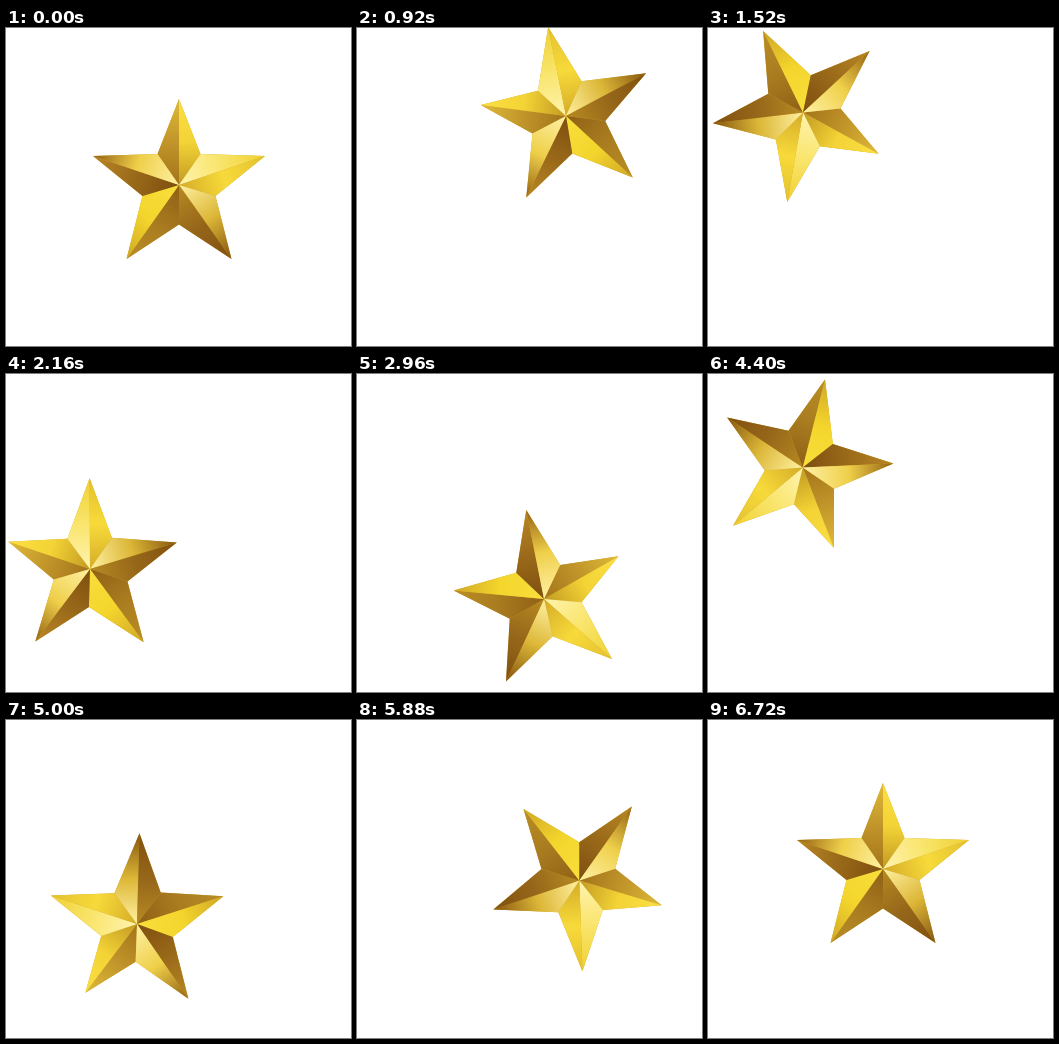
An HTML page with a canvas that plays this animation: 345x318 px, repeating every 6760 ms.

```html
<!DOCTYPE html>
<html lang="en">
<head>
<meta charset="utf-8">
<title>Tumbling gold star</title>
<style>
  html, body { margin: 0; width: 100%; height: 100%; overflow: hidden; background: #fff; }
  canvas { display: block; }
</style>
</head>
<body>
<canvas id="stage" width="345" height="318"></canvas>
<script>
const ctx = document.getElementById('stage').getContext('2d');
const STEP = 40, STEPS = 169;

// Star geometry around its centre, clockwise from the top
const tips = [[0, -86], [86, -29], [52.5, 74], [-52.5, 74], [-86, -29]];
const notches = [[21.5, -31], [36.5, 11], [0, 39.5], [-36.5, 11], [-21.5, -31]];

// Per arm: both facets, shaded from tip to centre
const shades = [
  [['#dfba38', '#c1952a', '#a3741a'], ['#fbe043', '#f3d336', '#c29a22']],
  [['#efd031', '#f9e56c', '#fff3ae'], ['#e3c02f', '#f7da3a', '#d5ac28']],
  [['#85540f', '#dcb737', '#fff0a0'], ['#80500e', '#96671a', '#b78a22']],
  [['#b98d25', '#a97c20', '#8f6015'], ['#d0a726', '#f3d52c', '#f9df3c']],
  [['#b98725', '#9a6a1a', '#7e4e10'], ['#936012', '#efd04a', '#fff0a4']]
];

// Path: step, x, y, and 1 where the star bounces sharply
const path = [
  [0, 173, 157, 1], [17, 246, 109], [19, 251, 103, 1], [23, 209, 88], [34, 116, 72],
  [42, 83, 107], [51, 80, 172], [54, 84, 195], [68, 149.5, 223], [74, 187, 225],
  [85, 250, 228], [87, 254, 225, 1], [96, 172, 149], [102, 132, 102], [106, 109, 83],
  [111, 94, 99], [119, 111, 159.5], [125, 131, 204], [130, 150, 214, 1],
  [136, 171, 193], [153, 251, 143, 1], [160, 215, 138], [168, 175, 149, 1]
];

// Spin: step, degrees
const spin = [
  [0, 0], [17, 208], [23, 277.3], [34, 432], [51, 630], [54, 648.4], [68, 756],
  [74, 780.1], [96, 1113], [102, 1204], [119, 1278], [125, 1296.9], [136, 1414], [168, 1800]
];

function segment(keys, s) {
  let i = 0;
  while (i < keys.length - 2 && s >= keys[i + 1][0]) i++;
  return i;
}

function slope(keys, a, b, axis) {
  return (keys[b][axis] - keys[a][axis]) / (keys[b][0] - keys[a][0]);
}

function curve(keys, s, axis) {
  const i = segment(keys, s), a = keys[i], b = keys[i + 1];
  const span = b[0] - a[0], u = (s - a[0]) / span;
  const m0 = a[3] ? slope(keys, i, i + 1, axis) : slope(keys, i - 1, i + 1, axis);
  const m1 = b[3] ? slope(keys, i, i + 1, axis) : slope(keys, i, i + 2, axis);
  const u2 = u * u, u3 = u2 * u;
  return (2 * u3 - 3 * u2 + 1) * a[axis] + (u3 - 2 * u2 + u) * span * m0
       + (3 * u2 - 2 * u3) * b[axis] + (u3 - u2) * span * m1;
}

function angle(s) {
  const i = segment(spin, s);
  return spin[i][1] + (s - spin[i][0]) * slope(spin, i, i + 1, 1);
}

function fill(points, style) {
  ctx.beginPath();
  points.forEach(p => ctx.lineTo(p[0], p[1]));
  ctx.closePath();
  ctx.fillStyle = style;
  ctx.fill();
}

function facet(tip, notch, colors) {
  const g = ctx.createLinearGradient(tip[0], tip[1], 0, 0);
  colors.forEach((c, i) => g.addColorStop(i / 2, c));
  fill([[0, 0], notch, tip], g);
}

function draw(s) {
  ctx.setTransform(1, 0, 0, 1, 0, 0);
  ctx.fillStyle = '#fff';
  ctx.fillRect(0, 0, 345, 318);
  ctx.translate(curve(path, s, 1), curve(path, s, 2));
  ctx.rotate(angle(s) * Math.PI / 180);
  // Gold base hides the seams between facets
  fill(tips.flatMap((t, i) => [t, notches[i]]), '#cfa62c');
  tips.forEach((tip, i) => {
    facet(tip, notches[(i + 4) % 5], shades[i][0]);
    facet(tip, notches[i], shades[i][1]);
  });
}

const start = performance.now();
function tick() {
  draw(Math.floor((performance.now() - start) / STEP) % STEPS);
  requestAnimationFrame(tick);
}
tick();
</script>
</body>
</html>
```
